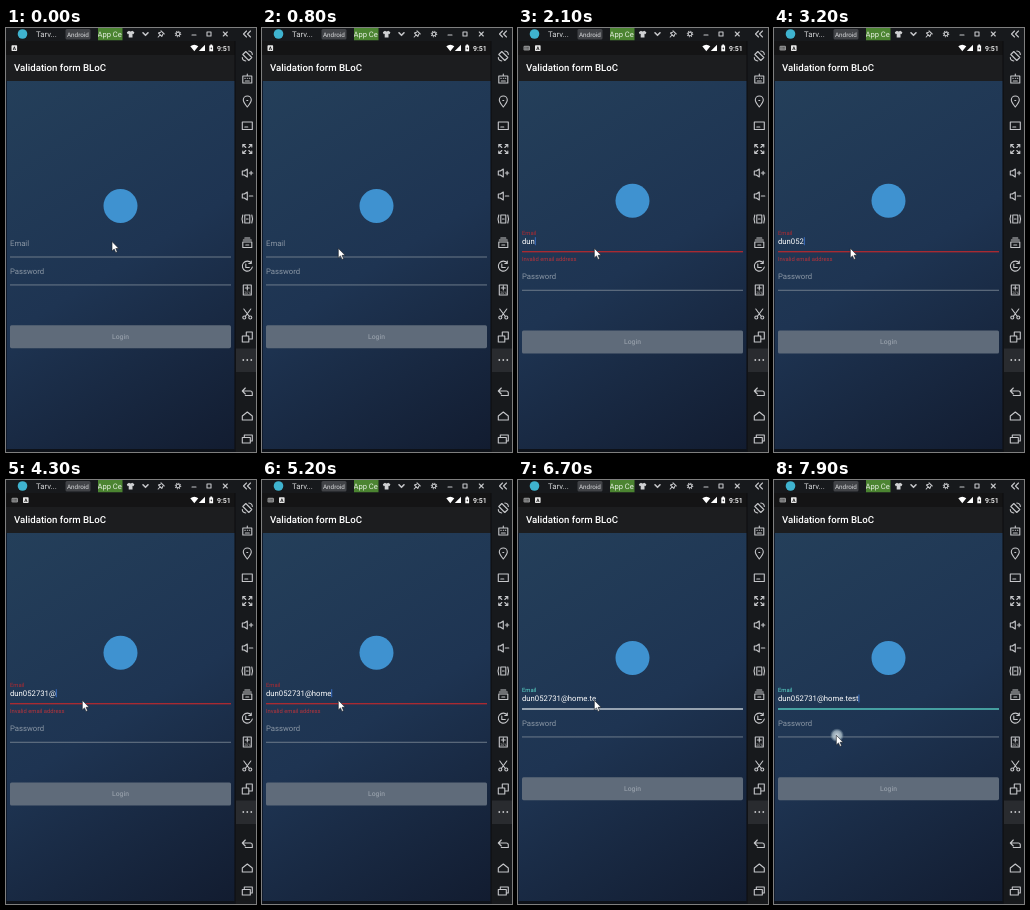
Recreate the animation shown at these times as an HTML page. Size 250 by 424 pixels, loop 8000 ms.

```html
<!DOCTYPE html>
<html lang="en">
<head>
<meta charset="utf-8">
<title>Validation form</title>
<style>
  html, body { margin: 0; width: 100%; height: 100%; overflow: hidden; background: #17191c; }
  svg { display: block; width: 100vw; height: 100vh; }
  text { font-family: Roboto, "Liberation Sans", sans-serif; white-space: pre; text-rendering: geometricPrecision; }
  .medium { font-weight: 500; }
  .icon { fill: none; stroke: #c6c7ca; stroke-width: 1.1; stroke-linecap: round; stroke-linejoin: round; }
</style>
</head>
<body>
<svg viewBox="0 0 250 424" preserveAspectRatio="none">
  <defs>
    <linearGradient id="sky" gradientUnits="userSpaceOnUse" x1="0" y1="53" x2="229" y2="421">
      <stop offset="0" stop-color="#243f5a"/>
      <stop offset="0.5" stop-color="#1e3452"/>
      <stop offset="1" stop-color="#121c30"/>
    </linearGradient>
    <radialGradient id="glow">
      <stop offset="0" stop-color="#dfe9ee" stop-opacity="0.9"/>
      <stop offset="0.65" stop-color="#b4c6cf" stop-opacity="0.75"/>
      <stop offset="1" stop-color="#8ea5b4" stop-opacity="0.1"/>
    </radialGradient>
    <clipPath id="tab"><rect x="92" y="0" width="24.5" height="12.5"/></clipPath>
  </defs>

  <rect width="250" height="424" fill="#17191c"/>
  <rect y="13" width="229" height="14" fill="#141415"/>
  <rect y="27" width="229" height="26" fill="#1c1d1f"/>
  <rect y="53" width="229" height="368" fill="url(#sky)"/>
  <rect y="53" width="1" height="368" fill="#101a2b"/>
  <rect x="228.500" y="13" width="1" height="411" fill="#0c0d0f"/>
  <rect y="421" width="229" height="3" fill="#0d1118"/>

  <!-- window bar -->
  <circle cx="16.500" cy="6" r="4.800" fill="#3fb3cf"/>
  <text x="30" y="8.700" font-size="7.800" fill="#d5d6d8">Tarv...</text>
  <rect x="59.500" y="1" width="25" height="10.400" rx="1.500" fill="#414347"/>
  <text x="61" y="8.500" font-size="6.300" fill="#d9dadc">Android</text>
  <g clip-path="url(#tab)">
    <rect x="92" width="25" height="12.500" fill="#4b8431"/>
    <text x="91.500" y="8.900" font-size="7.600" fill="#e6efe2">App Ce</text>
  </g>
  <path fill="#d0d1d3" d="M123 2.800l-2.200 1.500.9 2 1-.5v3.700h3.800v-3.700l1 .5.9-2-2.200-1.500q-1.600 1.200-3.200 0z"/>
  <g class="icon">
    <path d="M137 4.800l2.500 2.500 2.500-2.500" stroke-width="1.600"/>
    <path d="M155 2.800l3.200 3.200M154.500 4.200l-2 .9 3.300 3.300.9-2M154 7l-1.800 2M186 7h4M201 4h4v4h-4zM217.300 4l4 4M221.300 4l-4 4M240.500 3l-3 3 3 3M244.500 3l-3 3 3 3"/>
    <circle cx="172" cy="6" r="1.800"/>
    <circle cx="172" cy="6" r="2.700" stroke-dasharray="1.060 1.060" stroke-linecap="butt"/>
  </g>

  <!-- status bar -->
  <g id="keyboard" fill="#8f9091">
    <rect x="5.500" y="17.800" width="6.500" height="4.600" rx="1.200"/>
    <path d="M6.500 19.400h4.500M6.500 20.900h4.500" stroke="#222" stroke-width="0.600" stroke-dasharray="0.800 0.500"/>
  </g>
  <g id="badge">
    <rect x="5.500" y="17.300" width="5.600" height="5.600" rx="0.700" fill="#e8e8e8"/>
    <text x="6.700" y="21.900" font-size="4.800" font-weight="700" fill="#111">A</text>
  </g>
  <path fill="#fff" d="M184.300 18.300q4-3 8 0l-4 5zM199 16.800v6.200h-6.200z"/>
  <path fill="#fff" d="M203.300 17.500h1v-.9h1.800v.9h1v5.700h-3.800z"/>
  <path fill="#141415" d="M205.600 18.500l-1.300 2h.9l-.4 1.700 1.400-2.200h-.9z"/>
  <text class="medium" x="211" y="22.600" font-size="7" fill="#fff">9:51</text>
  <text class="medium" x="8" y="43.200" font-size="9.660" fill="#fff">Validation form BLoC</text>

  <!-- emulator tools -->
  <rect x="230" y="320.500" width="20" height="23.500" fill="#292b2f"/>
  <g id="tools" class="icon"></g>
  <text x="238.200" y="265.900" font-size="3.600" fill="#c4c5c7">20%</text>
  <g fill="#c4c5c7"><circle cx="237.300" cy="332" r="0.900"/><circle cx="241.300" cy="332" r="0.900"/><circle cx="245.300" cy="332" r="0.900"/></g>

  <!-- form -->
  <circle id="emblem" cx="114.500" cy="178" r="17" fill="#3f92d0"/>
  <text id="label" x="4">Email</text>
  <text id="value" x="4" font-size="7.730" fill="#fff"></text>
  <rect id="caret" width="0.800" height="8" fill="#4285f4"/>
  <rect id="line" x="4" width="221"/>
  <text id="error" x="4" y="232.600" font-size="5.800" fill="#b8333a">Invalid email address</text>
  <g id="lower">
    <text x="4" y="245.700" font-size="7.730" fill="#8b97a5">Password</text>
    <rect x="4" y="256.500" width="221" height="0.900" fill="#74818f"/>
    <rect x="4" y="297.200" width="221" height="23" rx="1.600" fill="#5f6b7a"/>
    <text class="medium" x="114.500" y="311.200" font-size="6.800" text-anchor="middle" fill="#949da8">Login</text>
  </g>

  <circle id="touch" r="6.800" fill="url(#glow)"/>
  <path id="mouse" d="M0 0v9.600l2.200-2 1.500 3.500 1.600-.7-1.500-3.400h3z" fill="#fff" stroke="#14181f" stroke-width="0.600"/>
</svg>

<script>
const el = Object.fromEntries([...document.querySelectorAll("svg [id]")].map(n => [n.id, n]));
const set = (node, attrs) => { for (const k in attrs) node.setAttribute(k, attrs[k]); };

// Each tool icon is drawn around its own centre.
const tools = [
  [28, "M-1.500-4.500L4.500 1.500 1.500 4.500-4.500-1.500zM1.500-5Q5-4.500 5-1.500M-1.500 5Q-5 4.500-5 1.500"],
  [51, "M-4.500-3H4.500V4H-4.500zM-2.500-0.800H-2M0-0.800H0.200M2-0.800H2.500M-2 2H2M0-3v-2"],
  [74, "M0 5Q-4 0-4-2A4 4 0 0 1 4-2Q4 0 0 5M-0.500-1.500H0.500"],
  [98, "M-5-4H5V3.500H-5zM-2.500 1H0.500"],
  [121, "M-4.500-2V-4.500H-2M-4.500-4.500l3 3M4.500-2V-4.500H2M4.500-4.500L1.500-1.500M-4.500 2V4.500H-2M-4.500 4.500l3-3M4.500 2V4.500H2M4.500 4.500L1.500 1.500"],
  [145, "M-5-2h2L0-4V4L-3 2h-2zM2 0H5.500M3.800-1.800V1.800"],
  [168, "M-5-2h2L0-4V4L-3 2h-2zM2 0H5.500"],
  [191, "M-2.500-4H2.500V4H-2.500zM-4.500-4Q-6 0-4.500 4M4.500-4Q6 0 4.500 4M-0.800 0H0.800"],
  [215, "M-4.500-1H4.500V4.500H-4.500zM-4-3H4M-2.500-5H2.500M-1.500 2H1.500"],
  [238, "M4-3A5 5 0 1 0 5 1M4-5v2.500H1.500M-1.500-2V1.500H2"],
  [262, "M-4-5H4V5H-4zM0-4V0M-2-2H2"],
  [286, "M3.500-5L-2 2.500M-3.500-5L2 2.500M-4.500 3.500a1.500 1.500 0 1 0 3 0a1.500 1.500 0 1 0-3 0M1.500 3.500a1.500 1.500 0 1 0 3 0a1.500 1.500 0 1 0-3 0"],
  [309, "M-5-1H1.500V5H-5zM-1-1V-5H5V2H1.500"],
  [364, "M-2-4L-5-1L-2 2M-5-1H3Q5-1 5 1V3.500H-2"],
  [388, "M-5 0L0-4L5 0V4H-5z"],
  [411, "M-5-1.500H3V4H-5zM-3-1.500V-4H5V2H3"]
];
el.tools.innerHTML = tools.map(([y, d]) => `<path transform="translate(241.300 ${y})" d="${d}"/>`).join("");

const LOOP = 8000, STEP = 100;
const FOCUS = 1000, INVALID = 1500, VALID = 6700;
const typed = "dun052731@home.test";
const keyTimes = [1500, 1800, 2000, 2800, 3000, 3200, 3400, 3600, 3700, 4200,
                  4700, 4900, 5000, 5200, 6000, 6400, 6700, 6800, 6900];

const GREY = [116, 129, 143], HINT = [139, 151, 165], TEAL = [91, 219, 205],
      RED = [176, 42, 48], WHITE = [215, 223, 228];
const lerp = (a, b, p) => a + (b - a) * p;
const mix = (a, b, p) => `rgb(${a.map((v, i) => Math.round(lerp(v, b[i], p)))})`;
const progress = (t, start, length) => Math.min(1, Math.max(0, (t - start) / length));
const ease = p => p * p * (3 - 2 * p);

function render(t) {
  const focus = ease(progress(t, FOCUS, 200));
  const invalid = t >= INVALID && t < VALID;
  const alarm = invalid ? progress(t, INVALID - 100, 200) : 0;
  const shift = invalid ? 5.3 : 0;

  set(el.emblem, { cy: 178 - shift });
  set(el.lower, { transform: `translate(0 ${shift})` });
  set(el.label, {
    y: lerp(217.7, 212, focus) - shift,
    "font-size": lerp(7.73, 5.8, focus),
    fill: invalid ? mix(TEAL, RED, alarm) : mix(HINT, TEAL, focus)
  });

  const lineColor = invalid ? mix(TEAL, RED, alarm)
    : t >= VALID ? mix(WHITE, TEAL, progress(t, VALID, 200))
    : mix(GREY, TEAL, focus);
  const thickness = lerp(0.9, 1.3, focus);
  set(el.line, { y: 229 - shift - thickness / 2, height: thickness, fill: lineColor });
  set(el.error, { opacity: alarm });

  const count = keyTimes.filter(k => k <= t).length;
  el.value.textContent = typed.slice(0, count);
  set(el.value, { y: 221.3 - shift });

  // The caret blink restarts with every key and shows from the next step on.
  const since = t - (count ? keyTimes[count - 1] : FOCUS);
  const caretOn = since > 0 && since % 1000 < 500 || since >= 1000 && since % 1000 === 0;
  const width = count ? el.value.getComputedTextLength() : 0;
  set(el.caret, { x: 4 + width, y: 214.5 - shift, opacity: caretOn || since === 0 && t < VALID ? 0.85 : 0 });

  set(el.keyboard, { opacity: t >= FOCUS ? 1 : 0 });
  set(el.badge, { transform: `translate(${t >= FOCUS ? 11.5 : 0} 0)` });

  const toEmail = ease(progress(t, 200, 600));
  const toPassword = ease(progress(t, 7300, 300));
  const x = lerp(lerp(106, 76.3, toEmail), 62.3, toPassword);
  const y = lerp(lerp(213.5, 220.3, toEmail), 255.3, toPassword);
  set(el.mouse, { transform: `translate(${x} ${y})` });
  const touching = (t >= 900 && t < 1100) || t >= 7900;
  set(el.touch, { cx: x + 0.7, cy: y, opacity: touching ? 1 : 0 });
}

const begin = performance.now();
function tick() {
  const t = (performance.now() - begin) % LOOP;
  render(Math.floor(t / STEP) * STEP);
  requestAnimationFrame(tick);
}
tick();
</script>
</body>
</html>
```
